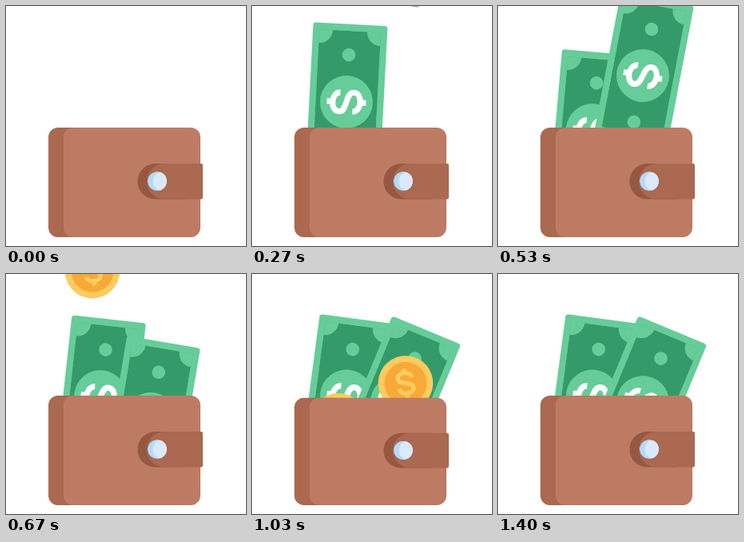
An HTML page with a canvas that plays this animation: 300 px wide and 300 px high, repeating every 2.51 s.

```html
<!DOCTYPE html>
<html lang="en">
<head>
<meta charset="utf-8">
<title>Wallet</title>
<style>
  html, body { margin: 0; width: 100%; height: 100%; overflow: hidden; background: #fff; }
  canvas { display: block; width: 100vw; height: 100vh; }
</style>
</head>
<body>
<canvas id="stage" width="300" height="300"></canvas>
<script>
const ctx = document.getElementById('stage').getContext('2d');
const LOOP = 2510, STEP = 100 / 3, LAST = 42, FLOOR = 289;

// Keys: [step, centre y, degrees]
const BILL_A = [[0, -102, 2], [8, 120, 3], [10, 174, 3.2], [13, 163.3, 4.3], [16, 155, 5], [20, 153.3, 6.3], [25, 152.6, 7.6]];
const BILL_B = [[7, -125.6, 10], [8, -102, 10.5], [13, 16.5, 11.8], [20, 181, 9.5], [23, 171, 17], [26, 162.5, 21], [30, 160.2, 22.5]];
const DIPS = [10, 20, 30, 36];

const S_CURVE = new Path2D('M11.5,-8 C11,-19.5 -12,-20 -12,-8.5 C-12,2 12,-2 12,8.5 C12,20 -11,19.5 -11.5,8');
const STEMS = new Path2D('M0,-17 V-24 M0,17 V24');

function sample(keys, k) {
  if (k <= keys[0][0]) return keys[0].slice(1);
  for (let i = 1; i < keys.length; i++) {
    const a = keys[i - 1], b = keys[i];
    if (k <= b[0]) {
      const p = (k - a[0]) / (b[0] - a[0]);
      return [a[1] + (b[1] - a[1]) * p, a[2] + (b[2] - a[2]) * p];
    }
  }
  return keys[keys.length - 1].slice(1);
}

function box(x, y, w, h, r, color) {
  ctx.fillStyle = color;
  ctx.beginPath();
  ctx.roundRect(x, y, w, h, r);
  ctx.fill();
}

function disc(x, y, r, color) {
  ctx.fillStyle = color;
  ctx.beginPath();
  ctx.arc(x, y, r, 0, Math.PI * 2);
  ctx.fill();
}

function placed(x, y, deg, draw) {
  ctx.save();
  ctx.translate(x, y);
  ctx.rotate(deg * Math.PI / 180);
  draw();
  ctx.restore();
}

function dollar(scale, deg, color) {
  placed(0, 0, deg, () => {
    ctx.scale(scale, scale);
    ctx.strokeStyle = color;
    ctx.lineWidth = 7;
    ctx.stroke(S_CURVE);
    ctx.stroke(STEMS);
  });
}

function bill(x, keys, k) {
  const [y, deg] = sample(keys, k);
  const light = '#66cc99', dark = '#359a69';
  placed(x, y, deg, () => {
    box(-46.5, -97.3, 93, 194.6, 3.5, light);
    ctx.save();
    ctx.beginPath();
    ctx.rect(-38.5, -89, 77, 178);
    ctx.clip();
    box(-38.5, -89, 77, 178, 0, dark);
    for (const sx of [-1, 1])
      for (const sy of [-1, 1]) disc(sx * 38.5, sy * 89, 17, light);
    ctx.restore();
    disc(0, -59, 8.3, light);
    disc(0, 59, 8.3, light);
    disc(0, 0, 33, light);
    dollar(1.02, 90, '#fff');
  });
}

function coin(x, y, deg) {
  placed(x, Math.min(y, 222), deg, () => {
    disc(0, 0, 34.3, '#fecb5f');
    disc(0, 0, 26.5, '#f7aa38');
    dollar(0.76, 0, '#fecb5f');
  });
}

// Each landing squashes the wallet for three steps down and three up
function squash(k) {
  let dip = 0;
  for (const start of DIPS) {
    const p = (k - start) / 6;
    if (p > 0 && p < 1) dip = (1 - Math.cos(p * Math.PI * 2)) / 2;
  }
  return 1 - 0.08 * dip;
}

function wallet(k) {
  ctx.save();
  ctx.translate(0, FLOOR);
  ctx.scale(1, squash(k));
  ctx.translate(0, -FLOOR);
  box(53, 152, 60, 137, 12, '#aa6950');
  box(72, 152, 171, 137, 12, '#bd7b63');
  box(164.5, 197, 60, 44.5, [22, 0, 0, 22], '#965842');
  box(176, 197, 70, 44.5, [22, 2, 2, 22], '#aa6950');
  ctx.save();
  ctx.beginPath();
  ctx.arc(189, 219, 12, 0, Math.PI * 2);
  ctx.clip();
  disc(189, 219, 12, '#b3dafe');
  disc(195.5, 219, 12, '#dbe9fd');
  ctx.restore();
  ctx.restore();
}

function render(k) {
  ctx.fillStyle = '#fff';
  ctx.fillRect(0, 0, 300, 300);
  ctx.save();
  ctx.beginPath();
  ctx.rect(0, 0, 300, 250);
  ctx.clip();
  bill(118, BILL_A, k);
  bill(181, BILL_B, k);
  coin(108, -3.8 + 17 * (k - 20), -9);
  coin(192, 51.5 + 17 * (k - 26), -8);
  ctx.restore();
  wallet(k);
}

const begin = performance.now();

function tick() {
  const t = (performance.now() - begin) % LOOP;
  const k = Math.floor((Math.floor(t / 10) * 10 + 4) / STEP);
  render(Math.min(k, LAST));
  requestAnimationFrame(tick);
}
tick();
</script>
</body>
</html>
```
